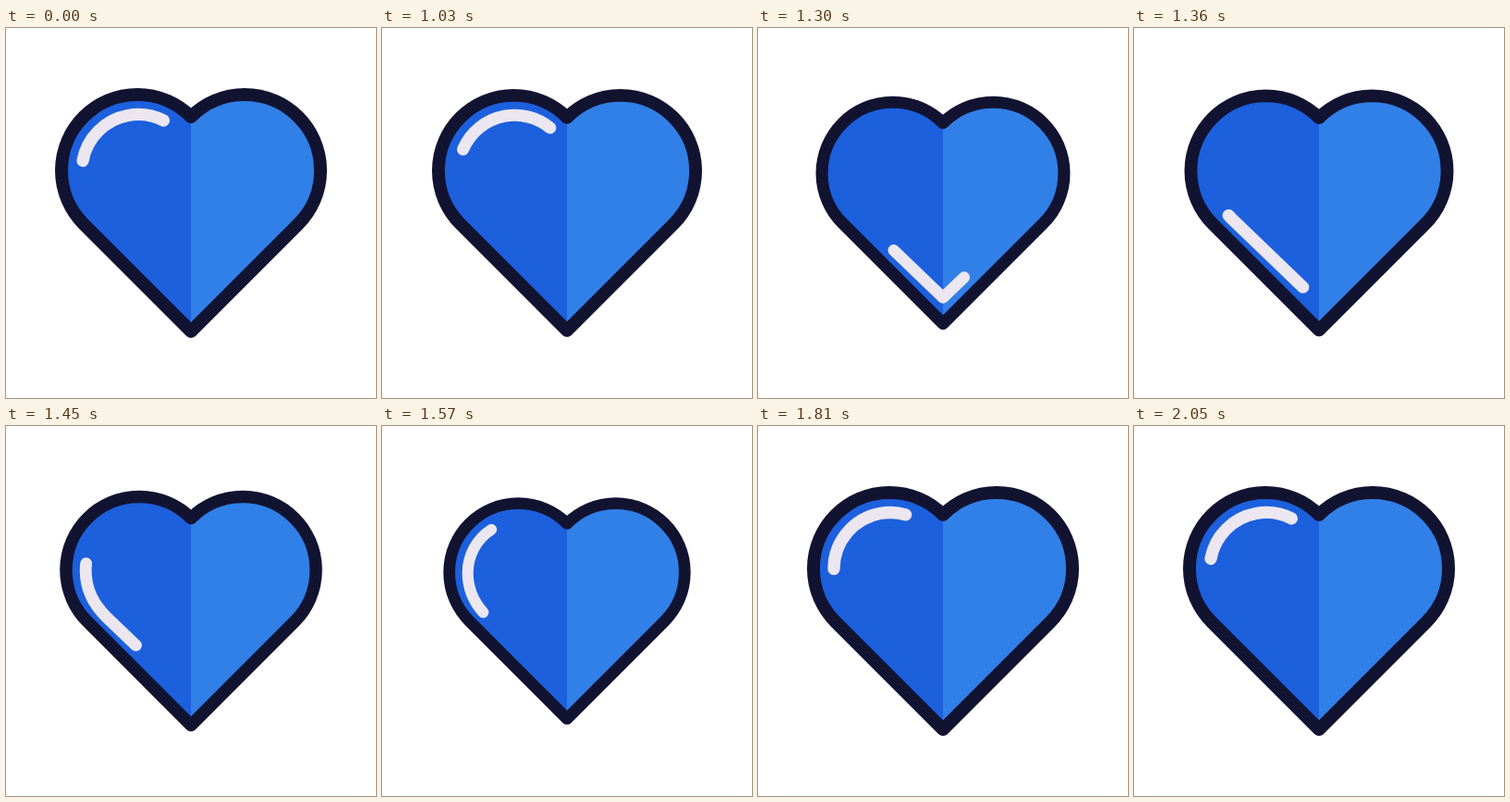
These frames come from a looping animation (400 by 400 pixels, 2.29 s). An HTML page:

```html
<!DOCTYPE html>
<html lang="en">
<head>
<meta charset="utf-8">
<title>Heartbeat</title>
<style>
  html, body { margin: 0; width: 100%; height: 100%; overflow: hidden; background: #fff; }
  svg { display: block; width: 100vw; height: 100vh; }
</style>
</head>
<body>
<svg viewBox="0 0 400 400">
  <g id="heart" stroke-linecap="round" stroke-linejoin="round">
    <path fill="#1c60de" d="M200 328L84 212A82 82 0 0 1 200 96Z"/>
    <path fill="#3080e8" d="M200 328L316 212A82 82 0 0 0 200 96Z"/>
    <path fill="none" stroke="#121331" stroke-width="14"
      d="M200 328L84 212A82 82 0 0 1 200 96A82 82 0 0 1 316 212Z"/>
    <path id="shine" fill="none" stroke="#ebe6ef" stroke-width="13.3"
      d="M82 154.5A61 61 0 0 1 200 132.8A61 61 0 0 1 318 154.5C318 175 309 193 295 206.5L200 297.8L105 206.5C91 193 82 175 82 154.5Z"/>
  </g>
</svg>
<script>
  const LOOP = 2290, FIRST = 1030, STEP = 30, LAST = 2050;
  const heart = document.getElementById('heart');
  const shine = document.getElementById('shine');
  const perimeter = shine.getTotalLength();
  const SHINE_START = 11, SHINE_LENGTH = 113;
  const BEATS = [[990, 1], [1240, 0.9], [1390, 1], [1540, 0.9], [1700, 1]];

  const clamp = x => Math.min(1, Math.max(0, x));
  const smooth = p => p * p * (3 - 2 * p);

  // Cubic bezier (0.3, 0, 0, 1), solved by bisection
  function glide(x) {
    let low = 0, high = 1;
    for (let i = 0; i < 30; i++) {
      const p = (low + high) / 2;
      if (0.9 * p * (1 - p) ** 2 + p ** 3 < x) low = p; else high = p;
    }
    return smooth(high);
  }

  function beat(t) {
    let size = BEATS[0][1];
    for (let i = 1; i < BEATS.length; i++) {
      const [t0, s0] = BEATS[i - 1], [t1, s1] = BEATS[i];
      if (t >= t0) size = s0 + (s1 - s0) * smooth(clamp((t - t0) / (t1 - t0)));
    }
    return size;
  }

  function draw(time) {
    const t = time % LOOP;
    const moving = t >= FIRST && t < LAST;
    const tick = FIRST + STEP * Math.floor((t - FIRST) / STEP);
    const size = moving ? beat(tick) : 1;
    const turn = moving ? glide(clamp((tick - 964) / 1062)) : 0;
    const start = (SHINE_START + turn * perimeter) % perimeter;
    heart.setAttribute('transform', `translate(200 200) scale(${size}) translate(-200 -200)`);
    shine.setAttribute('stroke-dasharray', `${SHINE_LENGTH} ${perimeter - SHINE_LENGTH}`);
    shine.setAttribute('stroke-dashoffset', -start);
  }

  const origin = performance.now();
  function frame() {
    draw(performance.now() - origin);
    requestAnimationFrame(frame);
  }
  frame();
</script>
</body>
</html>
```
